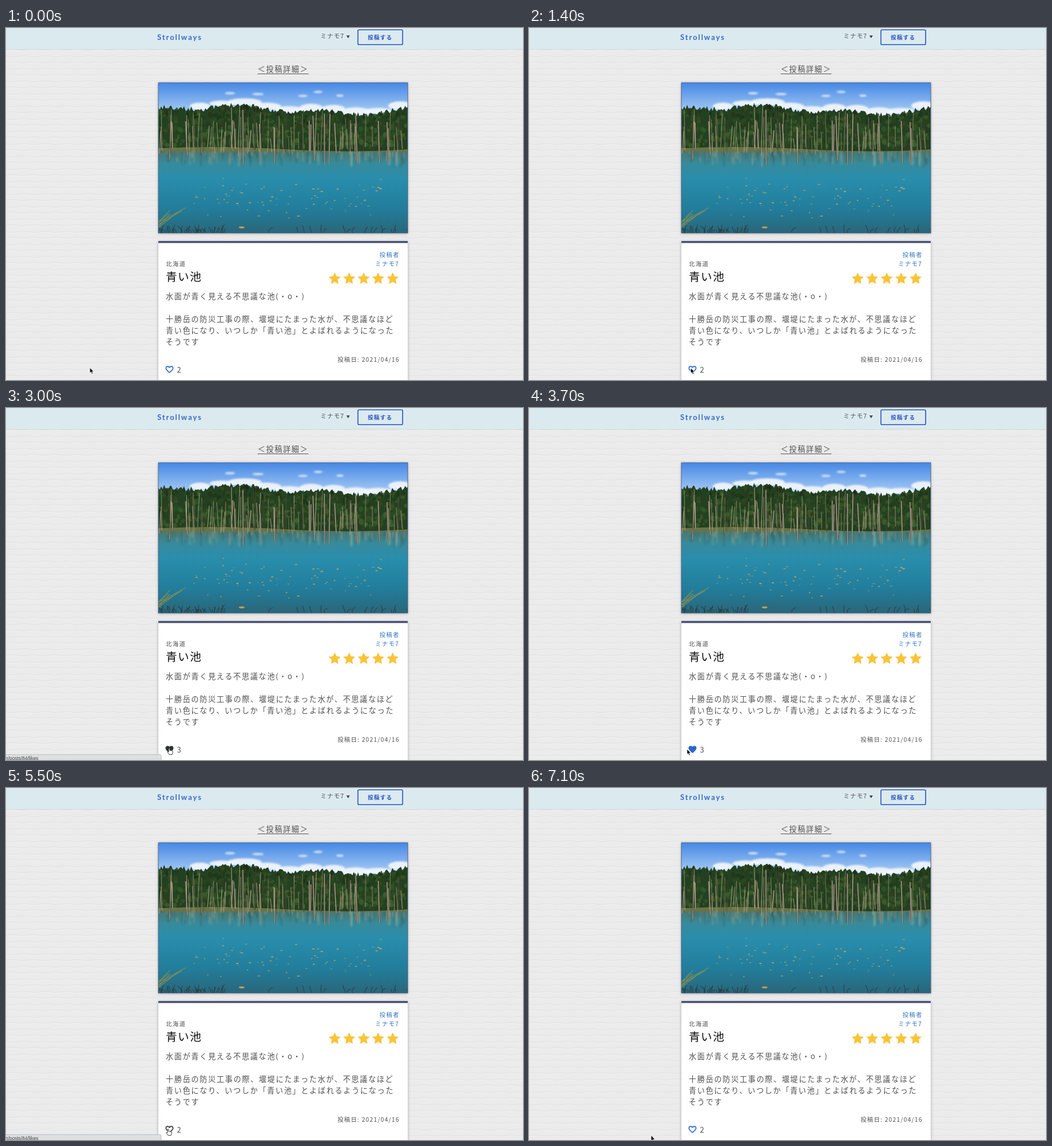
An HTML page for the animation above (7200 ms loop, 906 by 618 pixels).

```html
<!DOCTYPE html>
<html lang="ja">
<head>
<meta charset="utf-8">
<style>
  html, body { margin: 0; width: 100%; height: 100%; overflow: hidden; background: #ebebeb; }
  svg { display: block; }
  text { font-family: "Noto Sans CJK JP", "Noto Sans CJK", sans-serif; fill: #505050; }
  .body { font-size: 13.2px; letter-spacing: 1.65px; }
  .small { font-size: 10.5px; letter-spacing: 1.2px; }
  .link { fill: #3273c8; }
  .title { font-size: 19.8px; letter-spacing: 1.3px; fill: #111; }
  .brand { font: 700 13.2px Lato, sans-serif; letter-spacing: 1.85px; fill: #3569cc; }
  .button { font-size: 9.6px; font-weight: 700; letter-spacing: 1.2px; fill: #2450c4; }
  .status text { font: 8.4px "Liberation Sans", sans-serif; fill: #444; }
</style>
</head>
<body>
<svg width="906" height="618" viewBox="0 0 906 618">
  <defs>
    <pattern id="paper" width="38" height="22" patternUnits="userSpaceOnUse">
      <rect width="38" height="22" fill="#ebebeb"/>
      <path d="M0 5q9 3 19 1t19-1M0 16q10-2 19 0t19 0" fill="none" stroke="#e3e3e3"/>
      <path d="M0 7q9 3 19 1t19-1M0 18q10-2 19 0t19 0" fill="none" stroke="#efefef"/>
    </pattern>
    <linearGradient id="sky" x2="0" y2="1">
      <stop stop-color="#4688e4"/><stop offset="1" stop-color="#bcdaf8"/>
    </linearGradient>
    <linearGradient id="water" x2="0" y2="1">
      <stop stop-color="#4b776f"/><stop offset=".14" stop-color="#388a9a"/>
      <stop offset=".32" stop-color="#298eac"/><stop offset=".7" stop-color="#227d9b"/>
      <stop offset="1" stop-color="#2a667a"/>
    </linearGradient>
    <filter id="soft"><feGaussianBlur stdDeviation="1.6"/></filter>
    <filter id="shadow"><feDropShadow dx="0" dy="1" stdDeviation="2.5" flood-opacity=".3"/></filter>
    <clipPath id="frame"><rect x="267" y="96" width="437" height="264"/></clipPath>
  </defs>

  <rect width="906" height="618" fill="url(#paper)"/>
  <rect width="906" height="37" fill="#dbeaee"/>
  <path d="M0 37.5H906" stroke="#d2d8da"/>
  <text class="brand" x="265" y="20.5">Strollways</text>
  <text class="small" x="551" y="18">ミナモ7</text>
  <path d="M596.5 13h6l-3 5z" fill="#444"/>
  <rect x="616.7" y="3.2" width="78.4" height="26" rx="2" fill="none" stroke="#2450c4" stroke-width="1.6"/>
  <text class="button" x="634" y="20">投稿する</text>
  <text class="body" x="441" y="76.5">＜投稿詳細＞</text>
  <path d="M441 80.5h89" stroke="#555"/>

  <rect x="267" y="96" width="437" height="264" fill="#2c88a5" filter="url(#shadow)"/>
  <g id="photo" clip-path="url(#frame)"></g>
  <rect x="267" y="96" width="437" height="264" fill="none" stroke="#46608a" stroke-width=".9"/>

  <rect x="267" y="374" width="437" height="260" fill="#fff" filter="url(#shadow)"/>
  <rect x="267" y="374" width="437" height="3.5" fill="#474f76"/>
  <text class="small link" x="654.5" y="402">投稿者</text>
  <text class="small link" x="647" y="418">ミナモ7</text>
  <text class="small" x="280" y="417.8">北海道</text>
  <text class="title" x="280" y="444.3">青い池</text>
  <g id="stars" fill="#fcc430" stroke="#f0c255" stroke-width=".8" stroke-linejoin="round"></g>
  <text class="body" x="280" y="476.2">水面が青く見える不思議な池(・o・)</text>
  <text class="body" x="280" y="516">十勝岳の防災工事の際、堰堤にたまった水が、不思議なほど</text>
  <text class="body" x="280" y="536">青い色になり、いつしか「青い池」とよばれるようになった</text>
  <text class="body" x="280" y="556">そうです</text>
  <text class="small" x="581" y="586" style="font-size:10.4px">投稿日: 2021/04/16</text>

  <path id="heart" transform="translate(286.5 599.5)" stroke-width="1.6" stroke-linejoin="round"
    d="M0 5.5C-2 3.5-6.2.6-6.2-2.2C-6.2-5.8-1.8-6.6 0-3.4C1.8-6.6 6.2-5.8 6.2-2.2C6.2.6 2 3.5 0 5.5Z"/>
  <text id="count" class="body" x="299.5" y="604.5"></text>

  <g id="status" class="status">
    <rect id="bubble" x="-3" y="608.5" height="14" rx="2" fill="#dddfe2" stroke="#b9bcc0"/>
    <text x="-1" y="618">n/posts/84/likes</text>
  </g>
  <path id="arrow" d="M0 0V9.2L2.1 7.3L3.7 11L5.3 10.3L3.8 6.7H6.6Z" fill="#000" stroke="#fff" stroke-width=".7"/>
  <path id="hand" d="M-1 1Q0-.8 1 1V4.2Q2.3 3.2 3 4.6Q4.4 3.9 4.9 5.2Q6.4 5 6.3 6.7Q6.2 9 5 11.5H0Q-1.4 9-3 7.1Q-3.2 5.7-1 6.8Z"
    fill="#fff" stroke="#222" stroke-width=".9"/>
</svg>
<script>
const $ = id => document.getElementById(id);

let seed = 11;
const random = (lo = 0, hi = 1) => {
  seed = (seed * 16807) % 2147483647;
  return lo + (hi - lo) * seed / 2147483647;
};
const repeat = (n, make) => Array.from({ length: n }, (_, i) => make(i)).join('');
const ellipse = (x, y, rx, ry, fill, opacity = 1) =>
  `<ellipse cx="${x}" cy="${y}" rx="${rx}" ry="${ry}" fill="${fill}" opacity="${opacity}"/>`;
const line = (d, stroke, width, opacity = 1) =>
  `<path d="${d}" fill="none" stroke="${stroke}" stroke-width="${width}" opacity="${opacity}"/>`;

const LEFT = 267, RIGHT = 704, SHORE = 217;
const anyX = () => random(LEFT, RIGHT);

// Two waves give the rolling top of the forest.
function treeTop(x) {
  const a = (x - LEFT) / (RIGHT - LEFT) * 2 * Math.PI;
  return 142 - 6 * Math.sin(a) - 4 * Math.cos(3 * a);
}

function sky() {
  const bank = repeat(10, i => {
    const x = 340 + i * 39;
    return ellipse(x, treeTop(x) - 3, random(18, 32), random(5, 9), '#f4f8fd', .9);
  });
  const wisps = repeat(5, () => ellipse(random(390, 610), random(112, 125), random(6, 11), 2, '#e8f2fd', .8));
  return `<rect x="${LEFT}" y="96" width="437" height="64" fill="url(#sky)"/><g filter="url(#soft)">${bank + wisps}</g>`;
}

function forest() {
  let outline = `M${LEFT} 220`;
  for (let x = LEFT; x <= RIGHT + 2; x += 2.5) outline += `L${x} ${treeTop(x) + random(-3, 6)}`;
  const leaves = repeat(620, () => {
    const x = anyX(), y = random(treeTop(x) + 4, 208), light = random(13, 25) + (y - 150) * .09;
    return ellipse(x, y, random(1.5, 5), random(2, 6), `hsl(${random(90, 118)} 36% ${light}%)`, .8);
  });
  const bank = `<path d="M${LEFT} 211Q380 206 490 213T${RIGHT} 213V221H${LEFT}Z" fill="#6a7344"/>`;
  return `<path d="${outline}V220Z" fill="#234020"/>${leaves}${bank}`;
}

function water() {
  const streaks = repeat(150, () =>
    line(`M${anyX()} ${SHORE}v${random(4, 28)}`, random() < .4 ? '#a2b5a2' : '#2d616a', random(1, 2.5), .5));
  return `<rect x="${LEFT}" y="${SHORE}" width="437" height="143" fill="url(#water)"/><g filter="url(#soft)">${streaks}</g>`;
}

function trunks() {
  return repeat(125, i => {
    const x = anyX(), thick = i % 7 === 0;
    const top = random(treeTop(x) + 2, thick ? 180 : 195), base = random(208, thick ? 243 : 224);
    const d = `M${x} ${base}L${x + random(-3, 3)} ${top}`;
    return thick ? line(d, '#514b41', 2.4) + line(d, '#c4b79e', 1)
      : line(d, random() < .65 ? '#b3a58b' : '#4e4838', random(.5, 1.2), .85);
  });
}

function foreground() {
  const fallen = repeat(75, () =>
    ellipse(random(320, 670), 288 + random(-28, 55) * random(.3, 1), random(.7, 2.7), random(.5, 1.2), '#b9a663', .85));
  const grass = repeat(7, () =>
    line(`M${LEFT} ${random(335, 352)}l${random(15, 50)} ${random(-30, -16)}`, '#7f8f58', 1.1));
  const shrubs = repeat(60, i => {
    const x = i < 42 ? random(LEFT, 382) : random(400, RIGHT);
    return line(`M${x} 361q${random(-5, 5)} -7 ${random(-7, 7)} ${-random(6, 16)}`, '#253b3b', 1.1, .8);
  });
  return fallen + ellipse(413, 350, 5, 1.8, '#c49d52') + grass + shrubs;
}

const star = repeat(10, i => {
  const a = i * Math.PI / 5, r = i % 2 ? 5 : 10.3;
  return `${r * Math.sin(a)},${-r * Math.cos(a)} `;
});
$('photo').innerHTML = sky() + forest() + water() + trunks() + foreground();
$('stars').innerHTML = repeat(5, i => `<polygon points="${star}" transform="translate(${576 + i * 25.4} 440.3)"/>`);

const LOOP = 7200, STEP = 100;
const moves = [
  { from: 100, to: 1600, x: 286, y: 597 },
  { from: 3000, to: 3500, x: 277, y: 599 },
  { from: 3900, to: 4200, x: 284, y: 598.5 },
  { from: 5800, to: 7100, x: 214, y: 610 },
];
const within = (t, from, to) => t >= from && t < to;

function pointer(t) {
  let x = 147, y = 596.5;
  for (const m of moves) {
    const k = Math.min(1, Math.max(0, (t - m.from) / (m.to - m.from)));
    const ease = 1 - (1 - k) ** 2;
    x += (m.x - x) * ease;
    y += (m.y - y) * ease;
  }
  return [x, y];
}
function show(id, visible) { $(id).style.display = visible ? '' : 'none'; }

function draw(now) {
  const t = Math.floor(now % LOOP / STEP) * STEP;
  const hover = within(t, 1600, 3300) || within(t, 4100, 6000);
  const liked = within(t, 2700, 5100);
  const color = hover ? '#2d3436' : '#2868c8';
  $('heart').setAttribute('stroke', color);
  $('heart').setAttribute('fill', liked ? color : '#fff');
  $('count').textContent = liked ? 3 : 2;
  show('status', within(t, 1800, 3400) || within(t, 4200, 6100));
  $('bubble').setAttribute('width', t < 2900 ? 66 : 275);
  show('hand', hover);
  show('arrow', !hover);
  $(hover ? 'hand' : 'arrow').setAttribute('transform', `translate(${pointer(t)})`);
  requestAnimationFrame(draw);
}
requestAnimationFrame(draw);
</script>
</body>
</html>
```
